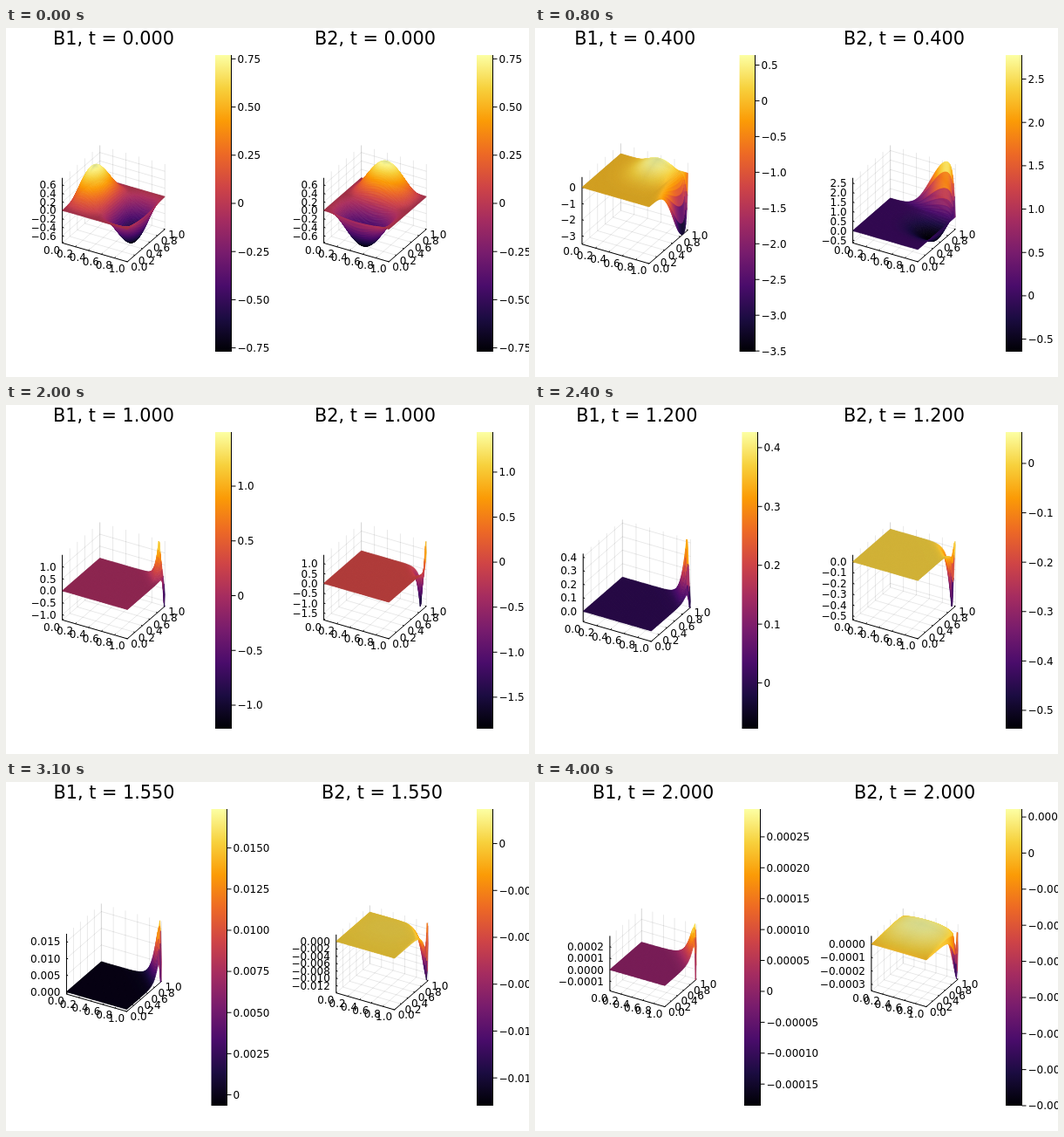
Recreate the animation shown at these times as an HTML page with a canvas. Size 600 by 400 pixels, loop 4100 ms.

```html
<!DOCTYPE html>
<html lang="en">
<head>
<meta charset="utf-8">
<title>B1 and B2 over time</title>
<style>
  html, body { margin: 0; width: 100%; height: 100%; overflow: hidden; background: #fff; }
  canvas { display: block; }
</style>
</head>
<body>
<canvas id="stage" width="600" height="400"></canvas>
<script>
const ctx = document.getElementById('stage').getContext('2d');
const FONT = '"DejaVu Sans", sans-serif';
const N = 72;               // cells per side
const DT = .05;             // model time per picture
const DIFFUSION = .03;
const TOP = 31, BOTTOM = 371;

const STOPS = ['000004', '1b0c41', '4a0c6b', '781c6d', 'a52c60', 'cf4446', 'ed6925', 'fb9b06', 'f7d13d', 'fcffa4']
  .map(h => [0, 2, 4].map(i => parseInt(h.slice(i, i + 2), 16)));

// Key points: time, lowest value, highest value, colour bar position
const FIELDS = [
  { name: 'B1', x: 0, sign: 1, keys: [
    [0, -.7698, .7698, 240],
    [.4, -3.51, .64, 234.6],
    [.7, -4.53, 1.31, 245],
    [1, -1.215, 1.494, 240],
    [1.35, -.0099, .1666, 235.5],
    [1.75, -.000044, .00181, 235.5],
    [2, -.000185, .000295, 240]
  ] },
  { name: 'B2', x: 300, sign: -1, keys: [
    [0, -.7698, .7698, 240],
    [.4, -.645, 2.777, 240],
    [.7, -1.34, 7.48, 240],
    [1, -1.85, 1.445, 240],
    [1.35, -.2125, .0061, 240],
    [1.75, -.00092, .000556, 240],
    [2, -.00035, .000061, 240]
  ] }
];

const clamp = v => Math.max(0, Math.min(1, v));
const mix = (a, b, u) => a + (b - a) * u;
// Geometric steps between two numbers of one sign
const mixLog = (a, b, u) => a * (b / a) ** u;

function sample(keys, t) {
  let i = 0;
  while (i < keys.length - 2 && t > keys[i + 1][0]) i++;
  const [a, b] = keys.slice(i), u = (t - a[0]) / (b[0] - a[0]);
  return { lo: mixLog(a[1], b[1], u), hi: mixLog(a[2], b[2], u), bar: mix(a[3], b[3], u) };
}

function inferno(v, shade = 1) {
  const p = clamp(v) * 9, i = Math.min(8, Math.floor(p));
  return 'rgb(' + STOPS[i].map((c, j) => Math.round(mix(c, STOPS[i + 1][j], p - i) * shade)) + ')';
}

// One-dimensional drift and diffusion between absorbing walls, one profile per picture
function drift() {
  const parts = 25, dt = DT / parts;
  let g = Array.from({ length: N + 1 }, (_, i) => (i / N * (1 - i / N)) ** 2);
  const profiles = [];
  for (let k = 0; k <= 1 / DT; k++) {
    profiles.push({ g, dg: g.map((_, i) => {
      const a = Math.max(0, i - 1), b = Math.min(N, i + 1);
      return (g[b] - g[a]) / (b - a);
    }) });
    for (let s = 0; s < parts; s++) {
      g = g.map((v, i) => i % N === 0 ? 0 : v
        - dt * N / 2 * (g[i + 1] - g[i - 1])
        + dt * N * N * DIFFUSION * (g[i + 1] - 2 * v + g[i - 1]));
    }
  }
  return profiles;
}
const PROFILES = drift();

function fit(z, lo, hi) {
  const top = Math.max(...z) || 1, low = Math.min(...z) || -1;
  return z.map(v => v > 0 ? v / top * hi : v / low * lo);
}

function build(fn) {
  const z = [];
  for (let j = 0; j <= N; j++) for (let i = 0; i <= N; i++) z.push(fn(i, j));
  return z;
}

function field(step, sign, lo, hi) {
  const t = step * DT, w = clamp((t - .7) / .3);
  const { g, dg } = PROFILES[Math.min(step, PROFILES.length - 1)];
  const early = fit(build((i, j) => sign > 0 ? dg[i] * g[j] : -g[i] * dg[j]), lo, hi);
  if (!w) return early;

  // Later on only a ridge and a dip remain, sliding into the corner
  const d = .02 + .05 * clamp((1.35 - t) / .35), r = .05 * t;
  const dome = sign > 0 ? 0 : (t - 1) ** 6;
  const spike = (x, y, a, b, size) => Math.exp(-(Math.abs(x - a) + Math.abs(y - b)) / size);
  const late = fit(build((i, j) => {
    const x = i / N, y = j / N;
    const bulge = Math.abs(Math.sin(Math.PI * x) * Math.sin(Math.PI * y * y)) ** .4;
    return sign * (spike(x, y, 1 - d, 1 - d / 2, r) - spike(x, y, 1, .98, .03)) + dome * bulge;
  }), lo, hi);
  return fit(early.map((v, i) => mix(v, late[i], w)), lo, hi);
}

// Smallest round step that gives no more than `most` intervals
function ticks(lo, hi, steps, most) {
  const range = hi - lo;
  let e = Math.floor(Math.log10(range / most)), m;
  while (!(m = steps.find(s => range / (s * 10 ** e) <= most))) e++;
  const step = m * 10 ** e;
  const digits = Math.max(0, -e + (m === 2.5 ? 1 : 0));
  const list = [];
  for (let k = Math.ceil(lo / step); k * step <= hi; k++) {
    const v = k * step;
    list.push({ v, label: (v < 0 ? '\u2212' : '') + Math.abs(v).toFixed(digits) });
  }
  return list;
}

function text(s, x, y, align, size = 12) {
  ctx.font = size + 'px ' + FONT;
  ctx.textAlign = align;
  ctx.textBaseline = 'alphabetic';
  ctx.fillStyle = '#000';
  ctx.fillText(s, x, y + size * .365);
}

function line(color, ...pts) {
  ctx.strokeStyle = color;
  ctx.beginPath();
  pts.forEach(p => ctx.lineTo(p[0], p[1]));
  ctx.stroke();
}

function surface(z, at, lo, hi) {
  const pts = build((i, j) => at(i / N, j / N, z[j * (N + 1) + i]));
  ctx.lineWidth = .6;
  for (let j = N - 1; j >= 0; j--) {
    for (let i = 0; i < N; i++) {
      const a = j * (N + 1) + i, q = [a, a + 1, a + N + 2, a + N + 1];
      const mean = q.reduce((sum, k) => sum + z[k], 0) / 4;
      const slope = (Math.abs(z[q[1]] - z[a]) + Math.abs(z[q[3]] - z[a])) * N / (hi - lo);
      ctx.fillStyle = ctx.strokeStyle = inferno((mean - lo) / (hi - lo), .84 + .16 * Math.min(1, slope));
      ctx.beginPath();
      q.forEach(k => ctx.lineTo(pts[k][0], pts[k][1]));
      ctx.closePath();
      ctx.fill();
      ctx.stroke();
    }
  }
}

function colorbar(x, lo, hi) {
  const grad = ctx.createLinearGradient(0, BOTTOM, 0, TOP);
  for (let i = 0; i <= 9; i++) grad.addColorStop(i / 9, inferno(i / 9));
  ctx.fillStyle = grad;
  ctx.fillRect(x, TOP, 18, BOTTOM - TOP);
  ctx.lineWidth = 1;
  const r = Math.floor(x + 18) + .5;
  line('#000', [r, TOP], [r, BOTTOM]);
  for (const { v, label } of ticks(lo, hi, [1, 2.5, 5], 10)) {
    const y = mix(BOTTOM, TOP, (v - lo) / (hi - lo));
    line('#000', [r, y], [r + 5, y]);
    text(v === 0 ? '0' : label, r + 7, y, 'left');
  }
}

function plot({ name, x, sign, keys }, step) {
  const t = step * DT;
  const { lo, hi, bar } = sample(keys, t);
  const zt = ticks(lo, hi, [1, 2, 5], 8);
  const unit = [0, .2, .4, .6, .8, 1];

  // The widest height label decides how much room the box gets
  ctx.font = '12px ' + FONT;
  const room = Math.max(...zt.map(k => ctx.measureText(k.label).width));
  const left = x + Math.max(51, 37.5 + .93 * room);
  const right = x + bar - 61.5 + .13 * room;
  const W = right - left, H = W * .634, base = 201.6 + W * .3805;
  const at = (u, v, z) => [
    left + W * (.634 * u + .366 * v),
    base + W * (.183 * u - .317 * v) - H * (z - lo) / (hi - lo)
  ];

  const grid = 'rgba(0,0,0,.09)';
  ctx.lineWidth = 1;
  for (const u of unit) {
    line(grid, at(u, 0, lo), at(u, 1, lo), at(u, 1, hi));
    line(grid, at(1, u, lo), at(0, u, lo), at(0, u, hi));
  }
  for (const { v } of zt) line(grid, at(0, 0, v), at(0, 1, v), at(1, 1, v));

  line('#000', at(0, 0, hi), at(0, 0, lo), at(1, 0, lo), at(1, 1, lo));
  for (const u of unit) {
    line('#000', at(u, 0, lo), at(u, .03, lo));
    line('#000', at(1, u, lo), at(.98, u, lo));
  }
  for (const { v } of zt) line('#000', at(0, 0, v), at(.025, 0, v));

  surface(field(step, sign, lo, hi), at, lo, hi);

  for (const u of unit) {
    const s = u.toFixed(1), a = at(u, 0, lo), b = at(1, u, lo);
    text(s, a[0] - 2.5, a[1] + 8, 'right');
    text(s, b[0] + 4, b[1] + 6, 'left');
  }
  for (const { v, label } of zt) text(label, left - 7, at(0, 0, v)[1], 'right');

  colorbar(x + bar, lo, hi);
  text(`${name}, t = ${t.toFixed(3)}`, (left + right) / 2, 11, 'center', 20.8);
}

let shown = -1;
function tick(now) {
  const step = Math.floor(now % 4100 / 100);
  if (step !== shown) {
    shown = step;
    ctx.fillStyle = '#fff';
    ctx.fillRect(0, 0, 600, 400);
    FIELDS.forEach(f => plot(f, step));
  }
  requestAnimationFrame(tick);
}
tick(0);
</script>
</body>
</html>
```
